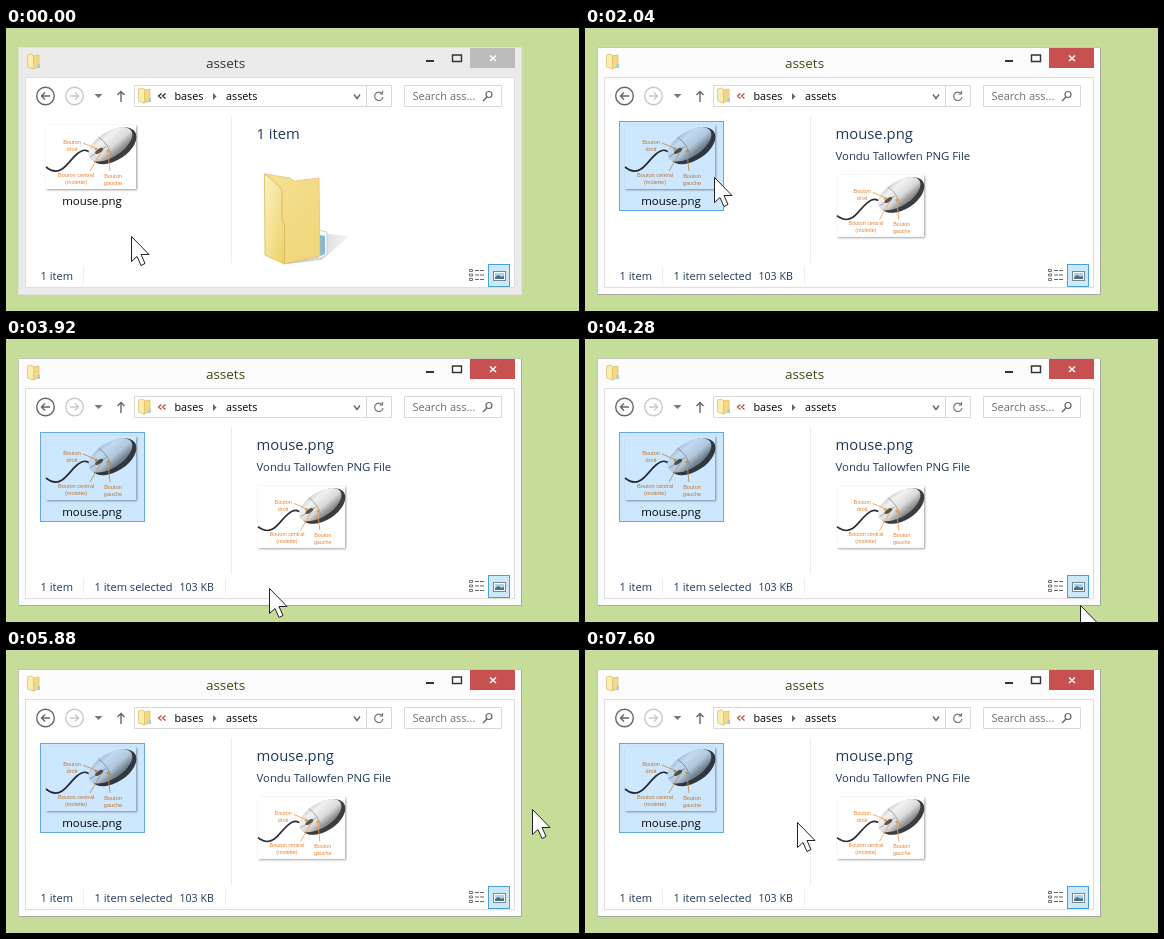
Recreate the animation shown at these times as an HTML page. Size 573x283 px, loop 8 s.

```html
<!DOCTYPE html>
<html lang="en">
<head>
<meta charset="utf-8">
<title>Folder window</title>
<style>
html, body { margin: 0; width: 100%; height: 100%; overflow: hidden; background: #c5dd98; }
svg { display: block; width: 573px; height: 283px; }
text { font: 10.8px "Open Sans", "Noto Sans", sans-serif; fill: #000; }
.head { font-size: 14.8px; fill: #1e395b; }
.info { font-size: 11.1px; fill: #1e395b; }
.file { font-size: 11.4px; }
.note { font: 5.6px "Liberation Sans", Arial, sans-serif; fill: #f0802c; text-anchor: middle; }
.line { fill: none; stroke: #666; stroke-width: 1.4; }
</style>
</head>
<body>
<svg viewBox="0 0 573 283">
  <defs>
    <linearGradient id="cover" x2="1" y2="1">
      <stop stop-color="#fdf3c0"/><stop offset="1" stop-color="#ecd069"/>
    </linearGradient>
    <linearGradient id="inside" x2=".6" y2="1">
      <stop stop-color="#f5e193"/><stop offset="1" stop-color="#f0d67c"/>
    </linearGradient>
    <linearGradient id="shade">
      <stop stop-color="#999"/><stop offset="1" stop-color="#eee"/>
    </linearGradient>
    <linearGradient id="shell" x2=".25" y2="1">
      <stop stop-color="#c4c4c4"/><stop offset=".3" stop-color="#f2f2f2"/>
      <stop offset=".7" stop-color="#dadada"/><stop offset="1" stop-color="#8c8c8c"/>
    </linearGradient>
    <filter id="soft" x="-10%" y="-10%" width="125%" height="130%">
      <feDropShadow dx="1" dy="1" stdDeviation="1" flood-opacity=".4"/>
    </filter>
    <g id="mini">
      <path d="M5 2L12 1V13L5 15Z" fill="#f3d985" stroke="#dcbd62" stroke-width=".7"/>
      <path d="M.5 1L5 0L6.500 2V15L.5 13Z" fill="#fbedb0" stroke="#dcbd62" stroke-width=".7"/>
      <path d="M10.500 10h2.500v4h-2.500z" fill="#a5cbe2"/>
    </g>
    <g id="photo">
      <rect width="90" height="64" fill="#fff" filter="url(#soft)"/>
      <path d="M0 42C5 46 10 48 16 44S25 34 31 29S41 24 46 29" fill="none" stroke="#2c2c34" stroke-width="1.700"/>
      <g transform="translate(66 20) rotate(-33)">
        <ellipse cx="1" cy="1.500" rx="25.500" ry="14.500" fill="#3c3c3e"/>
        <ellipse cx="-1" cy="-1.500" rx="25" ry="12.500" fill="url(#shell)"/>
        <path d="M-7 -14Q-2 -2 -7 10M-25 -2H-6" fill="none" stroke="#999" stroke-width=".8"/>
        <ellipse cx="-14" cy="-2" rx="4.500" ry="2" fill="#555"/>
      </g>
      <path d="M37 18L49 23M44 46L55 27M64 46L62 28" fill="none" stroke="#f0a050" stroke-width=".9"/>
      <circle cx="50" cy="24" r="1.600" fill="#eda045"/><circle cx="62" cy="26" r="1.600" fill="#eda045"/>
      <text class="note" x="26" y="19">Bouton</text>
      <text class="note" x="26" y="26">droit</text>
      <text class="note" x="30" y="52">Bouton central</text>
      <text class="note" x="30" y="59">(molette)</text>
      <text class="note" x="67" y="53">Bouton</text>
      <text class="note" x="67" y="60">gauche</text>
    </g>
  </defs>

  <rect width="573" height="283" fill="#c5dd98"/>
  <rect id="frame" x="12.500" y="19.500" width="503" height="247"/>
  <path id="edge" d="M13 266.500H515.500V20" fill="none" stroke="#a4aa9c"/>
  <path d="M20 50H508V259H20Z" fill="#fff"/>
  <path d="M19.500 49.500H508.500V259.500H19.500Z" fill="none" stroke="#dedede"/>

  <use href="#mini" x="21" y="26"/>
  <text id="title" x="219.500" y="40" text-anchor="middle" style="font-size:13.500px">assets</text>
  <path d="M420 33h8" stroke="#333" stroke-width="2"/>
  <path d="M446.500 27h9v6.500h-9z" class="line" style="stroke:#333"/>
  <rect id="close" x="464" y="20" width="45" height="20"/>
  <path d="M484 27.500l6 5.500m0-5.500l-6 5.500" stroke="#fff" stroke-width="1.500"/>

  <circle cx="39.500" cy="68" r="8.800" class="line"/>
  <path d="M44 68H35.500M39 64.500l-3.500 3.500l3.500 3.500" class="line"/>
  <g style="opacity:.35">
    <circle cx="68.500" cy="68" r="8.800" class="line"/>
    <path d="M64 68H72.500M69 64.500l3.500 3.500l-3.500 3.500" class="line"/>
  </g>
  <path d="M88.500 66h8l-4 4z" fill="#777"/>
  <path d="M115 74V63.500M111.500 67l3.500-3.500l3.500 3.500" class="line"/>
  <path d="M128.500 57.500h257v21h-257zM360.500 58v20M398.500 57.500h97v21h-97z" fill="none" stroke="#d9d9d9"/>
  <use href="#mini" x="132" y="60"/>
  <path id="chevrons" d="M155.500 65.500l-3 2.500l3 2.500M159.500 65.500l-3 2.500l3 2.500" fill="none" stroke-width="1.200"/>
  <text x="168.500" y="72">bases</text>
  <path d="M207 65v7l3.500-3.500z" fill="#666"/>
  <text x="220" y="72">assets</text>
  <path d="M348 66.500l3 4l3-4" class="line"/>
  <path d="M376 65.500a4.200 4.200 0 1 0 1 3.500M376.500 63v3h-3" class="line" style="stroke:#777;stroke-width:1.200"/>
  <text x="406.500" y="72" style="font-size:11px;fill:#6d6d6d">Search ass...</text>
  <circle cx="483" cy="66.500" r="3" class="line" style="stroke-width:1.200"/>
  <path d="M481 69l-4 4" class="line"/>

  <path d="M225.500 88V235" stroke="#eee"/>
  <g style="isolation:isolate">
    <use href="#photo" x="40" y="97"/>
    <rect id="item" x="34.500" y="93.500" width="104" height="89" style="mix-blend-mode:multiply"/>
    <text class="file" x="86" y="177" text-anchor="middle">mouse.png</text>
  </g>

  <text id="heading" class="head" x="250.500" y="111"></text>
  <text id="kind" class="info" x="250.500" y="132" style="font-size:11.350px">Vondu Tallowfen PNG File</text>
  <g id="folder">
    <path d="M314 205L343 208L316 232L280 236Z" fill="url(#shade)" opacity=".65"/>
    <path d="M312 202l9 2v23l-9 4z" fill="#f8fbfd" stroke="#b9c4cc" stroke-width=".700"/>
    <path d="M314 207l5 1v18l-5 2z" fill="#82b7d8"/>
    <path d="M259 146L284 150L288 153L313 150L314 228L278 236Z" fill="url(#inside)" stroke="#dfc06a" stroke-width=".700"/>
    <path d="M258.500 145.500L272 157Q276 160 276 165V192L278.500 196V236L259 227Z" fill="url(#cover)" stroke="#d8b659" stroke-width=".800"/>
  </g>
  <use id="preview" href="#photo" transform="translate(252 147) scale(.966 .966)"/>

  <text class="info" x="34.500" y="252">1 item</text>
  <g id="details">
    <text class="info" x="88.500" y="252">1 item selected</text>
    <text class="info" x="173.500" y="252" style="font-size:10.600px">103 KB</text>
    <path d="M219.500 239V256" stroke="#eee"/>
  </g>
  <path d="M77.500 239V256" stroke="#eee"/>
  <path d="M463.500 241.500h3v2h-3zm0 4.500h3v2h-3zm0 4.500h3v2h-3z" fill="#fff" stroke="#666" stroke-width=".900"/>
  <path d="M469 242.500h4m1 0h4m-9 4.500h4m1 0h4m-9 4.500h4m1 0h4" stroke="#666" stroke-width="1.200"/>
  <rect x="482.500" y="236.500" width="21" height="22" fill="#cde8f8" stroke="#4a9fd4"/>
  <rect x="487.500" y="243.500" width="12" height="9" fill="#fff" stroke="#7a8790"/>
  <path d="M489 245h9v3h-9z" fill="#a9d3ec"/>
  <path d="M489 251v-2l3-2l3 1.500l3-.5v3z" fill="#4a6f88"/>

  <g id="pointer" fill="#fff" stroke="#222">
    <path id="arrow" d="M.5 .5V25.500L6 20.500L10 29.500L14 27.500L10 18.500H18Z"/>
    <path id="resize" d="M-13 0L-7 -6V-2H7V-6L13 0L7 6V2H-7V6Z"/>
  </g>
</svg>
<script>
const LOOP = 8000, STEP = 40;
const el = id => document.getElementById(id);
const show = (id, on) => el(id).setAttribute("display", on ? "inline" : "none");
const set = (id, attrs) => {
  for (const name in attrs) el(id).setAttribute(name, attrs[name]);
};

// Pointer path: time, x, y
const path = [
  [240, 125, 208], [320, 121, 196], [440, 109, 154], [520, 106, 146],
  [1960, 106, 146], [2080, 140, 150], [2240, 214, 162], [2360, 239, 169],
  [2760, 239, 169], [2840, 242, 188], [2960, 247, 239], [3080, 248, 254], [3160, 244, 247],
  [3880, 244, 247], [4000, 300, 254], [4160, 428, 264], [4280, 495, 266], [4440, 507, 262],
  [4680, 507, 262], [4880, 508, 253],
  [5520, 508, 253], [5640, 518, 228], [5840, 526, 165], [5960, 526, 147],
  [6240, 526, 147], [6360, 518, 148], [6480, 511, 148],
  [7160, 511, 148], [7280, 440, 178], [7440, 285, 207], [7520, 235, 193], [7600, 212, 172]
];

function position(t) {
  const next = path.findIndex(p => p[0] > t);
  if (next === 0) return path[0].slice(1);
  if (next < 0) return path[path.length - 1].slice(1);
  const [t0, x0, y0] = path[next - 1], [t1, x1, y1] = path[next];
  const u = (t - t0) / (t1 - t0);
  return [x0 + (x1 - x0) * u, y0 + (y1 - y0) * u].map(Math.round);
}

function draw(time) {
  const t = Math.floor((time % LOOP) / STEP) * STEP;
  const [x, y] = position(t);
  const selected = t >= 1000, active = t >= 1040, preview = t >= 1120;
  const hover = y < 183 && !selected;

  set("frame", { fill: active ? "#fcfcfc" : "#ebebeb", stroke: active ? "#c3c8ba" : "#dde2d4" });
  show("edge", active);
  set("close", { fill: active ? "#c75050" : "#bcbcbc" });
  set("chevrons", { stroke: active ? "#b04a35" : "#222" });
  el("title").style.fill = active ? "#3a4c14" : "#333";

  set("item", {
    fill: selected ? "#cde7ff" : hover ? "#e5f3fb" : "none",
    stroke: selected ? "#66a7e0" : hover ? "#70c0e7" : "none"
  });
  el("heading").textContent = selected ? "mouse.png" : "1 item";
  show("kind", selected);
  show("details", selected);
  show("folder", !preview);
  show("preview", preview);

  const diagonal = t >= 5000 && t < 5520;
  const sideways = t >= 6400 && t < 7200;
  show("arrow", !diagonal && !sideways);
  show("resize", diagonal || sideways);
  const place = diagonal ? "translate(508.5 262.5) rotate(45)"
    : sideways ? `translate(${x + .5} ${y + .5})`
    : `translate(${x} ${y})`;
  set("pointer", { transform: place });
}

const start = performance.now();
function tick() {
  draw(performance.now() - start);
  requestAnimationFrame(tick);
}
tick();
</script>
</body>
</html>
```
